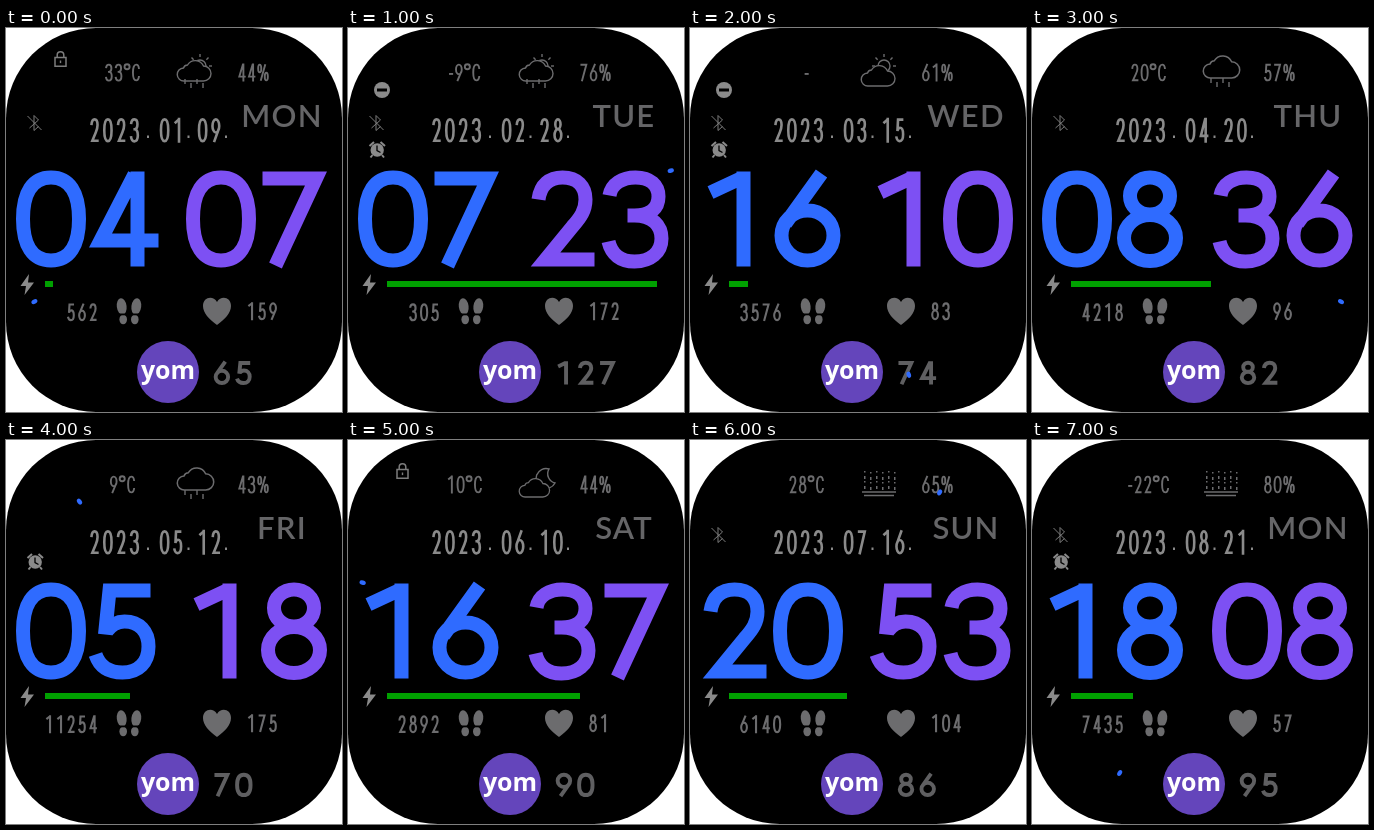
These frames come from a looping animation (336x384 px, 8 s). An HTML page with a canvas:

```html
<!DOCTYPE html>
<html lang="en">
<head>
<meta charset="utf-8">
<title>Watch face</title>
<style>
  html, body { margin: 0; width: 100%; height: 100%; overflow: hidden; background: #fff; }
  canvas { display: block; border-radius: 90px; background: #000; }
</style>
</head>
<body>
<canvas id="face" width="336" height="384"></canvas>
<script>
const ctx = document.getElementById('face').getContext('2d');
const BLUE = '#2f6bff', PURPLE = '#7d50f3', GRAY = '#6c6c6e', LIGHT = '#8a8a8a';

// Centre lines of the numerals in a 71 x 97 cell
const GLYPHS = {
  0: 'M7.5,48.5C7.5,22 17,7 35.5,7S63.5,22 63.5,48.5 54,90 35.5,90 7.5,75 7.5,48.5Z',
  1: 'M11,22L41,8M44,1V96',
  2: 'M11,29C13,14 22,7 35,7C50,7 58,16 58,29C58,40 53,47 45,56L18,89H67',
  3: 'M9,25C11,13 22,7 35,7C50,7 58,15 58,26C58,38 50,45 34,45H27M34,45C52,45 61,55 61,68C61,82 50,91 34,91C20,91 11,84 8,71',
  4: 'M70,70H12L46,4M49,1V96',
  5: 'M62,8H21L16.5,52M18,49C23,42 29,39 36,39C51,39 60,49 60,64C60,80 50,90 34,90C20,90 11,84 7,72',
  6: 'M9,65a26,25 0 1 1 52,0a26,25 0 1 1 -52,0M49,3L13,53',
  7: 'M4,8H57.5L17,95',
  8: 'M15.5,25.5a20,18.5 0 1 1 40,0a20,18.5 0 1 1 -40,0M9.5,67.5a26,23 0 1 1 52,0a26,23 0 1 1 -52,0',
  9: 'M9,32a26,25 0 1 1 52,0a26,25 0 1 1 -52,0M21,94L57,44',
  C: 'M62,30C60,14 50,7 36,7C18,7 7,22 7,48S18,90 36,90C50,90 60,83 62,67',
  '%': 'M7,27a14,20 0 1 1 28,0a14,20 0 1 1 -28,0M67,70a14,20 0 1 1 28,0a14,20 0 1 1 -28,0M72,5L30,92',
  '°': 'M1,18a23,13 0 1 1 46,0a23,13 0 1 1 -46,0',
  '-': 'M3,56H40'
};
const WIDTHS = { '°': 0.8, '-': 0.65, '%': 1.3 };

const BIG = { sx: 1, sy: 1, step: 73, line: 14 };
const DATE = { sx: 0.13, sy: 0.262, step: 13.3, line: 2.6, color: LIGHT };
const AIR = { sx: 0.11, sy: 0.19, step: 9.7, line: 1.9, color: GRAY };
const COUNT = { ...AIR, step: 11, line: 2.1 };
const SCORE = { sx: 0.24, sy: 0.245, step: 21.8, line: 3.9, color: '#5f5f61' };

const CLOUD = 'M178,58a6.5,6.5 0 0 1 -.5,-13q1,-3 4,-3a9,9 0 0 1 16,1a7.5,7.5 0 0 1 0,15z';

const STATES = [
  { hour: '04', minute: '07', second: 40, date: '01.09', day: 'MON', temp: '33°C', humidity: '44%', sky: 'showers', icons: 'LB', battery: 8, steps: '562', pulse: '159', score: '65' },
  { hour: '07', minute: '23', second: 12, date: '02.28', day: 'TUE', temp: '-9°C', humidity: '76%', sky: 'showers', icons: 'DBA', battery: 270, steps: '305', pulse: '172', score: '127' },
  { hour: '16', minute: '10', second: 27, date: '03.15', day: 'WED', temp: '-', humidity: '61%', sky: 'sunny', icons: 'DBA', battery: 19, steps: '3576', pulse: '83', score: '74' },
  { hour: '08', minute: '36', second: 20, date: '04.20', day: 'THU', temp: '20°C', humidity: '57%', sky: 'rain', icons: 'B', battery: 140, steps: '4218', pulse: '96', score: '82' },
  { hour: '05', minute: '18', second: 54, date: '05.12', day: 'FRI', temp: '9°C', humidity: '43%', sky: 'rain', icons: 'A', battery: 85, steps: '11254', pulse: '175', score: '70' },
  { hour: '16', minute: '37', second: 48, date: '06.10', day: 'SAT', temp: '10°C', humidity: '44%', sky: 'night', icons: 'L', battery: 193, steps: '2892', pulse: '81', score: '90' },
  { hour: '20', minute: '53', second: 5, date: '07.16', day: 'SUN', temp: '28°C', humidity: '65%', sky: 'fog', icons: 'B', battery: 118, steps: '6140', pulse: '104', score: '86' },
  { hour: '18', minute: '08', second: 35, date: '08.21', day: 'MON', temp: '-22°C', humidity: '80%', sky: 'fog', icons: 'BA', battery: 62, steps: '7435', pulse: '57', score: '95' }
];

function fill(path, color) {
  ctx.fillStyle = color;
  ctx.fill(new Path2D(path));
}

function stroke(path, color = GRAY, width = 1.4) {
  ctx.strokeStyle = color;
  ctx.lineWidth = width;
  ctx.stroke(new Path2D(path));
}

function oval(x, y, rx, ry, color, angle = 0) {
  ctx.fillStyle = color;
  ctx.beginPath();
  ctx.ellipse(x, y, rx, ry, angle, 0, 7);
  ctx.fill();
}

function rect(x, y, w, h, color) {
  ctx.fillStyle = color;
  ctx.fillRect(x, y, w, h);
}

function label(text, x, y, font, color, spacing = '0px') {
  ctx.font = font;
  ctx.letterSpacing = spacing;
  ctx.textAlign = 'center';
  ctx.fillStyle = color;
  ctx.fillText(text, x, y);
}

// align: 0 left, 0.5 centre, 1 right
function numerals(text, x, y, style, align = 0, color = style.color) {
  const widths = [...text].map(c => style.step * (WIDTHS[c] || 1));
  const gap = style.step - 71 * style.sx;
  x -= align * (widths.reduce((a, b) => a + b) - gap);
  ctx.strokeStyle = color;
  ctx.lineWidth = style.line;
  [...text].forEach((c, i) => {
    const path = new Path2D();
    path.addPath(new Path2D(GLYPHS[c]), new DOMMatrix([style.sx, 0, 0, style.sy, x, y]));
    ctx.stroke(path);
    x += widths[i];
  });
}

function cloud(lift, scale = 1) {
  ctx.save();
  ctx.translate(171, 58 - lift);
  ctx.scale(scale, scale);
  ctx.translate(-171, -58);
  fill(CLOUD, '#000');
  stroke(CLOUD);
  ctx.restore();
}

function sun() {
  stroke('M188,38a6,6 0 1 1 12,0a6,6 0 1 1 -12,0');
  for (let i = 0; i < 6; i++) {
    const a = (i * 45 - 180) * Math.PI / 180, c = Math.cos(a), s = Math.sin(a);
    stroke(`M${194 + 9 * c},${38 + 9 * s}L${194 + 12 * c},${38 + 12 * s}`);
  }
}

function drops(y, count) {
  for (let i = 0; i < count; i++) stroke(`M${179 + i * 6},${y + i % 2 * 4}v5`);
}

const sky = {
  sunny() { sun(); cloud(0); },
  showers() { sun(); cloud(5); drops(51, 4); },
  rain() { cloud(8, 1.08); drops(50, 4); },
  night() {
    stroke('M201,29a9.5,9.5 0 0 0 6,14a10,10 0 1 1 -6,-14z');
    cloud(1, 0.9);
  },
  fog() {
    for (let i = 0; i < 6; i++)
      for (let j = 0; j < 4; j++) rect(174 + i * 6, 31 + j * 5 + i % 2, 1.5, j % 2 ? 3 : 1.5, GRAY);
    stroke('M172,52H206M174,55.5H204');
  }
};

const icons = {
  L() {
    stroke('M49,29.5h11v8.8h-11zM51.2,29v-2a3.3,3.3 0 0 1 6.6,0v2', '#7c7c7c', 1.5);
    rect(53.8, 32.5, 1.4, 2.6, '#7c7c7c');
  },
  D() {
    oval(34, 62, 8, 8, LIGHT);
    rect(29, 60.5, 10, 3, '#000');
  },
  B() { stroke('M21.5,88L35.5,102M23.5,100L32.5,92L28,87.5V102.5L32.5,98.5', '#7c7c7c', 1); },
  A() {
    oval(29.2, 122, 6.7, 6.7, LIGHT);
    stroke('M21.5,118l4.5,-4M37,118l-4.5,-4M24.5,127l-2,2.5M34,127l2,2.5', LIGHT, 2);
    stroke('M29,117.5V122.5L32.5,124.5', '#000', 1.3);
  }
};

function foot(x, side) {
  oval(x, 278.5, 4.9, 8.4, GRAY, -0.12 * side);
  oval(x + 1.5 * side, 291.5, 3.8, 4.8, GRAY);
  rect(x - 6, 285.5, 13, 1.8, '#000');
}

function draw(s) {
  ctx.clearRect(0, 0, 336, 384);
  for (const c of s.icons) icons[c]();

  numerals(s.temp, 116.5, 35.3, AIR, 0.5);
  sky[s.sky]();
  numerals(s.humidity, 232, 35.3, AIR);

  const [month, date] = s.date.split('.');
  numerals('2023', 84, 89.5, DATE);
  numerals(month, 154, 89.5, DATE);
  numerals(date, 192, 89.5, DATE);
  for (const x of [141, 181.5, 219]) rect(x, 107.5, 2, 2.5, LIGHT);
  label(s.day, 276, 99, '600 31px Lato, sans-serif', '#656567', '1.2px');

  numerals(s.hour, 9.5, 142.5, BIG, 0, BLUE);
  numerals(s.minute, 179.5, 142.5, BIG, 0, PURPLE);

  fill('M23,246L14.5,258H20L18.5,267L28,254.5H22Z', LIGHT);
  rect(39, 253, s.battery, 6, '#00a000');

  numerals(s.steps, 91, 275, COUNT, 1);
  foot(115.7, 1);
  foot(130.3, -1);
  fill('M211,297C203,291 197,285 197,278C197,269 207,267 211,274C215,267 225,269 225,278C225,285 219,291 211,297Z', GRAY);
  numerals(s.pulse, 241.2, 274, COUNT);

  oval(162, 344, 31, 31, '#6445bb');
  label('yom', 162, 351, 'bold 25px "Open Sans", sans-serif', '#fff');
  numerals(s.score, 207.5, 333, SCORE);

  const angle = s.second * Math.PI / 30 - Math.PI / 2;
  oval(168.7 + 162 * Math.cos(angle), 192.7 + 162 * Math.sin(angle), 3.2, 2.2, BLUE, angle);
}

function tick() {
  draw(STATES[Math.floor(performance.now() / 1000) % STATES.length]);
  requestAnimationFrame(tick);
}
tick();
</script>
</body>
</html>
```
